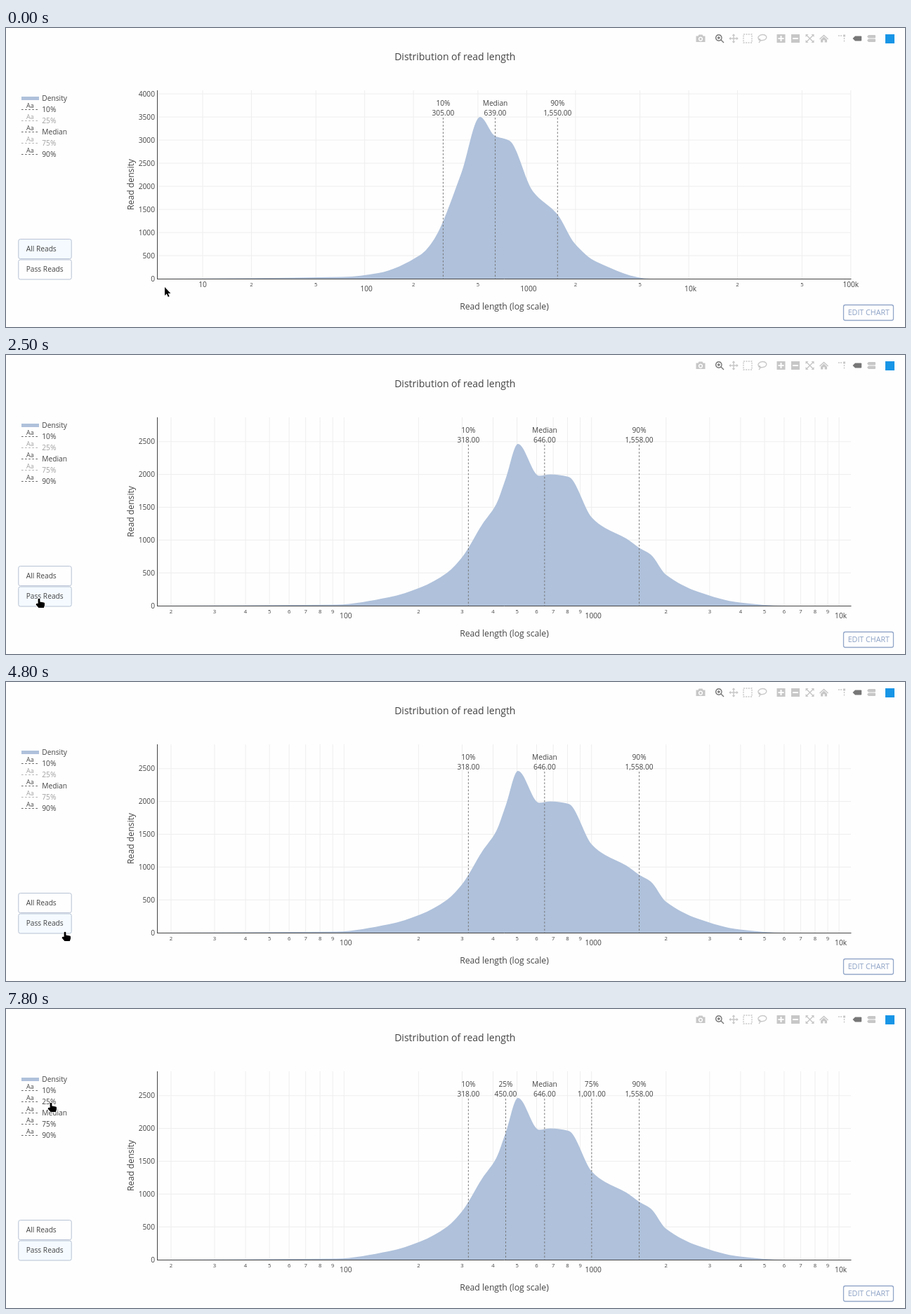
An HTML page with a canvas that plays this animation: 1280x427 px, repeating every 8 s.

```html
<!DOCTYPE html>
<html lang="en">
<head>
<meta charset="utf-8">
<title>Distribution of read length</title>
<style>
  html, body { margin: 0; width: 100%; height: 100%; overflow: hidden; background: #fefefe; }
  canvas { display: block; }
</style>
</head>
<body>
<canvas id="stage" width="1280" height="427"></canvas>
<script>
const ctx = document.getElementById('stage').getContext('2d');
const LOOP = 8000, LEFT = 215, RIGHT = 1203, TOP = 89, BASE = 358;
const PAPER = '#fefefe', INK = '#444', BLUE = '#afc1db', PALE = '#c7c7c7', DARK = '#777', DASH = [2.6, 2.5];
const NAMES = ['10%', '25%', 'Median', '75%', '90%'];

// Shape-preserving cubic through a few key points, level at every peak and dip
function smoothArea(points) {
  const last = points.length - 1;
  const chord = i => (points[i + 1][1] - points[i][1]) / (points[i + 1][0] - points[i][0]);
  const slope = i => {
    if (i === 0 || i === last) return 0;
    const a = chord(i - 1), b = chord(i);
    return a * b > 0 ? 2 * a * b / (a + b) : 0;
  };
  const path = new Path2D();
  path.moveTo(...points[0]);
  for (let i = 0; i < last; i++) {
    const [x0, y0] = points[i], [x1, y1] = points[i + 1], s = (x1 - x0) / 3;
    path.bezierCurveTo(x0 + s, y0 + s * slope(i), x1 - s, y1 - s * slope(i + 1), x1, y1);
  }
  path.closePath();
  return path;
}

const allReads = {
  x10: 280, decade: 230.7, digits: [1, 2, 5], step: 33, rows: 8,
  marks: { '10%': 305, 'Median': 639, '90%': 1550 },
  area: smoothArea([
    [LEFT, BASE], [480, 355.5], [530, 350], [590, 324], [610, 301], [648, 208], [675, 127], [696, 154],
    [717, 161], [750, 233], [785, 266], [810, 308], [840, 333.5], [918, BASE]])
};
const passReads = {
  x10: 128.9, decade: 352.4, digits: [1, 2, 3, 4, 5, 6, 7, 8, 9], step: 46.85, rows: 5,
  marks: { '10%': 318, '25%': 450, 'Median': 646, '75%': 1001, '90%': 1558 },
  area: smoothArea([
    [LEFT, BASE], [470, 356.5], [545, 346], [590, 332], [628, 311], [650, 288], [678, 242], [698, 213],
    [712, 175], [729, 127], [759, 172.5], [775, 170.5], [801, 174], [834, 232], [853, 247], [883, 262],
    [901, 275], [918, 285], [940, 314], [985, 338], [1045, 353.5], [1110, BASE]])
};

// Pointer moves: start, end, goal x, goal y
const moves = [
  [400, 1300, 47, 347], [2600, 2900, 69, 318], [3800, 3900, 74, 312], [4000, 4400, 84, 356],
  [4800, 4900, 84, 326], [5000, 5600, 97, 93], [5600, 5900, 59, 165], [6800, 7000, 64, 133]];

function pointerAt(t) {
  t = Math.floor(t / 100) * 100;
  let x = 226, y = 370;
  for (const [from, to, goalX, goalY] of moves) {
    const k = Math.min(1, Math.max(0, (t - from) / (to - from)));
    x += (goalX - x) * k;
    y += (goalY - y) * k;
  }
  return [Math.round(x), Math.round(y)];
}

function text(str, x, y, size = 10.2, align = 'center', color = INK) {
  ctx.font = `${size}px "Open Sans", "Noto Sans", sans-serif`;
  ctx.textAlign = align;
  ctx.fillStyle = color;
  ctx.fillText(str, x, y);
}

function line(x0, y0, x1, y1, color, dash = []) {
  ctx.setLineDash(dash);
  ctx.strokeStyle = color;
  ctx.lineWidth = 1;
  ctx.beginPath();
  ctx.moveTo(x0, y0);
  ctx.lineTo(x1, y1);
  ctx.stroke();
  ctx.setLineDash([]);
}

function box(x, y, w, h, fill, stroke, weight = 1) {
  ctx.beginPath();
  ctx.roundRect(x, y, w, h, 2.5);
  ctx.fillStyle = fill;
  ctx.fill();
  ctx.strokeStyle = stroke;
  ctx.lineWidth = weight;
  ctx.stroke();
}

// Toolbar: centre x, colour, filled path, stroked path, dash
const icons = [
  [989, PALE, 'M-6.5-3.5h3l1-2h5l1 2h3v8.5h-13zM0-2.5a3.2 3.2 0 1 0 .01 0zM0-1a1.7 1.7 0 1 1-.01 0z', ''],
  [1016, DARK, '', 'M-1.2-5.2a4.2 4.2 0 1 0 .01 0zM2 2L6 6M-3.3-1h4.2M-1.2-3.1v4.2'],
  [1036, PALE, 'M0-6.8l2.3 2.8h-4.6zM0 6.8l2.3-2.8h-4.6zM-6.8 0l2.8-2.3v4.6zM6.8 0l-2.8-2.3v4.6z', 'M0-5V5M-5 0H5'],
  [1056, PALE, '', 'M-6-6H6V6H-6z', [2, 1.43]],
  [1077, PALE, '', 'M-4 2C-9-1-4-6 1-5.5 8-5 7 2 0 2.6-3 3-6 2-5 1c2-1 3 2 0 5'],
  [1103.5, PALE, 'M-6-6H6V6H-6zM-1-4V-1H-4V1H-1V4H1V1H4V-1H1V-4z', ''],
  [1124, PALE, 'M-6-6H6V6H-6zM-4-1V1H4V-1z', ''],
  [1144.5, PALE, 'M-6-6h4l-4 4zM6-6v4l-4-4zM6 6h-4l4-4zM-6 6v-4l4 4z', 'M-5-5L5 5M5-5L-5 5'],
  [1164.5, PALE, 'M0-5.5L6.5.5l-1 1L0-3.6-5.5 1.5l-1-1zM0-2.5L4.5 1.7V5.5H1.2V2.2H-1.2V5.5H-4.5V1.7z', ''],
  [1190, PALE, 'M2-5.5h3v3h-3z', 'M-5-4h2M-2-4h2M3.5-1v2M3.5 2.5v2'],
  [1212, DARK, 'M-6.5 0L-3-3.6H5.2q1 0 1 1V2.6q0 1-1 1H-3z', ''],
  [1232, PALE, 'M-6-2.8L-4-5H5q1 0 1 1v2.4q0 1-1 1H-4zM-6 2.8L-4 .6H5q1 0 1 1V4q0 1-1 1H-4z', '']
].map(([x, color, fill, stroke, dash = []]) => ({ x, color, fill: new Path2D(fill), stroke: new Path2D(stroke), dash }));

function drawToolbar() {
  for (const { x, color, fill, stroke, dash } of icons) {
    ctx.save();
    ctx.translate(x, 15);
    ctx.fillStyle = ctx.strokeStyle = color;
    ctx.lineWidth = 1.4;
    ctx.setLineDash(dash);
    ctx.fill(fill, 'evenodd');
    ctx.stroke(stroke);
    ctx.restore();
  }
  ctx.fillStyle = '#1795e6';
  ctx.fillRect(1252, 9, 13, 13);
}

function drawChart(view, t, shown) {
  const xOf = value => view.x10 + view.decade * (Math.log10(value) - 1);
  const ticks = [];
  for (let power = 0; power <= 5; power++) {
    for (const digit of view.digits) {
      const x = xOf(digit * 10 ** power);
      if (x > LEFT + 4 && x < RIGHT + 1) ticks.push({ x, digit, power });
    }
  }
  for (const { x } of ticks) line(x, TOP, x, BASE, '#eee');
  for (let i = 0; i <= view.rows; i++) {
    const y = BASE - i * view.step;
    if (i) line(LEFT, y, RIGHT, y, '#eee');
    text(i * 500, 212, y + 3.6, 10.2, 'right');
  }
  ctx.fillStyle = BLUE;
  ctx.fill(view.area);
  line(LEFT + .5, TOP, LEFT + .5, BASE + 1, INK);
  line(LEFT, BASE + .5, RIGHT + .5, BASE + .5, INK);

  const powers = ['1', '10', '100', '1000', '10k', '100k'];
  for (const { x, digit, power } of ticks) {
    if (digit > 1) { text(digit, x, 368.5, 7.7); continue; }
    const nudged = view === passReads || (t < 2500 && power > 1 && power < 5);
    text(powers[power], x + (nudged ? 2.5 : 0), nudged ? 375.8 : 370.3);
  }
  for (const name of shown) {
    const value = view.marks[name], x = xOf(value);
    line(x, 128, x, BASE, DARK, DASH);
    text(name, x, 111);
    text(value.toLocaleString('en-US', { minimumFractionDigits: 2 }), x, 124.7);
  }
  text('Distribution of read length', 639.3, 46.2, 14);
  text('Read length (log scale)', 709.5, 401.8, 12.2);
  ctx.save();
  ctx.translate(182.3, 223.5);
  ctx.rotate(-Math.PI / 2);
  text('Read density', 0, 0, 12.2);
  ctx.restore();
}

function drawLegend(shown) {
  ctx.fillStyle = BLUE;
  ctx.fillRect(22, 98, 25, 5);
  text('Density', 51.3, 104.3, 10.2, 'left');
  NAMES.forEach((name, i) => {
    const y = 116.5 + 16 * i;
    ctx.globalAlpha = shown.includes(name) ? 1 : .5;
    line(22, y, 46, y, '#666', DASH);
    text('Aa', 34.3, y - 2.2, 8.8);
    text(name, 51.3, y + 3.9, 10.2, 'left');
    ctx.globalAlpha = 1;
  });
}

const arrow = new Path2D('M0 0V12L2.8 9.5 4.8 14 6.6 13.2 4.7 8.9H8.4z');
const hand = new Path2D('M-1.4 1.4Q0 0 1.4 1.4V5.4L7 6.4Q8 6.8 8 7.8V10.5L6.8 14H-.6L-4.4 9.4Q-4.2 7-1.4 8z');

function draw(t) {
  const pass = (t >= 2500 && t < 3200) || t >= 4800;
  const shown = NAMES.filter(name => !(name === '75%' && t < 6400) && !(name === '25%' && t < 7800));
  const [px, py] = pointerAt(t);
  const over = (x, y, w, h) => px >= x && px <= x + w && py >= y && py <= y + h;

  ctx.fillStyle = PAPER;
  ctx.fillRect(0, 0, 1280, 427);
  drawToolbar();
  drawChart(pass ? passReads : allReads, t, shown);
  drawLegend(shown);

  let clickable = over(20, 92, 72, 97);
  const button = (label, y, active) => {
    const hover = over(18, y, 75, 28);
    clickable ||= hover;
    box(17.8, y, 75.4, 28, active || hover ? '#f4faff' : PAPER, '#b6c1d3');
    text(label, 28.7, y + 17, 10.2, 'left');
  };
  button('All Reads', 301.6, !pass);
  button('Pass Reads', 331, pass);
  box(1192.5, 395.5, 71, 22, PAPER, '#92a6c8', 1.3);
  text('EDIT CHART', 1228.3, 410.2, 10.7, 'center', '#8ca1c5');

  ctx.save();
  ctx.translate(px, py);
  const shape = clickable ? hand : arrow;
  ctx.lineWidth = 1.4;
  ctx.strokeStyle = '#fff';
  ctx.stroke(shape);
  ctx.fillStyle = '#000';
  ctx.fill(shape);
  ctx.restore();
}

const start = performance.now();
function frame() {
  draw((performance.now() - start) % LOOP);
  requestAnimationFrame(frame);
}
frame();
</script>
</body>
</html>
```
